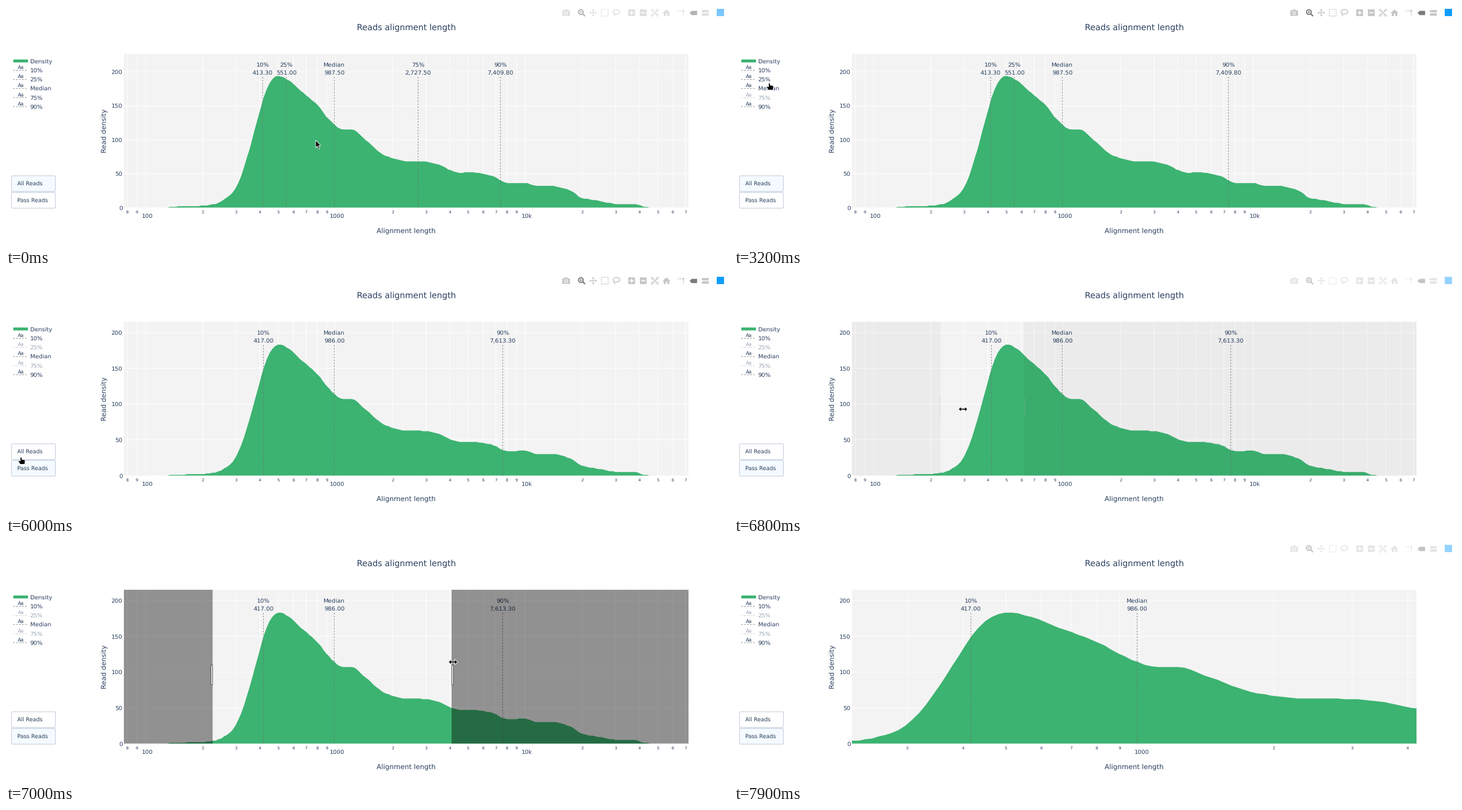
A matplotlib script for the animation above (8000 ms loop, 1280 px wide and 427 px high).

```python
import math

import matplotlib.pyplot as plt
import numpy as np
from matplotlib.animation import FuncAnimation
from matplotlib.collections import LineCollection
from matplotlib.patches import Circle, Ellipse, FancyBboxPatch, Polygon, Rectangle

W, H, DPI = 1280, 427, 64
PT = 72 / DPI  # points per pixel
STEP, FRAMES = 100, 80

LEFT, RIGHT, TOP, BOTTOM = 209, 1210, 85, 358.6
HUNDRED_X, DECADE = 247.7, 336.4
SEL_LEFT, SEL_RIGHT = 366.3, 793.3
INK, GREEN, GREY, DARK = "#2a3f5f", "#3cb371", "#c7c7c7", "#7c7c7c"

PASS_CLICK, PRESS, RELEASE, LEAVE = 5500, 6700, 7200, 7800
HIDE_AT = {"75%": 2500, "25%": 4300}

# turning points of the density curve: stage x, density
DENSITY = [
    (286, 0), (292, 1), (345, 2.6), (369, 5), (397, 18), (411, 35), (431, 84),
    (446, 130), (461, 172), (472, 189), (482, 194), (507, 184), (520, 174),
    (554, 149.5), (569, 133), (598, 115), (613, 115), (633, 103), (672, 76.5),
    (714, 68), (735, 68), (768, 63.5), (789, 54.5), (805, 51.3), (822, 52),
    (860, 47), (890, 36), (918, 36.5), (942, 32), (964, 32), (1000, 25.5),
    (1020, 14.5), (1050, 10), (1088, 5), (1114, 5), (1134, 1), (1155, 0)]
# share of reads that pass, by stage x
PASS_SHARE = [(370, .8), (411, .9), (490, .948), (620, .928), (840, .912), (900, .95)]
BIN = 5.03

QUANTILES = ["10%", "25%", "Median", "75%", "90%"]
ALL_MARKS = [413.3, 551, 987.5, 2727.5, 7409.8]
PASS_MARKS = [417, 551, 986, 2727.5, 7613.3]

# start and end in ms, cursor kind, where it goes
CURSOR_START = (549, 239)
CURSOR_MOVES = [
    (0, 100, "arrow", (546, 238)), (100, 200, "arrow", CURSOR_START),
    (300, 1200, "arrow", (73, 149)), (1200, 1600, "hand", (63, 161)),
    (2900, 3200, "hand", (63, 137)), (4300, 5100, "arrow", (96, 358)),
    (5100, 5500, "hand", (60, 346)), (5500, 6000, "hand", (27, 326)),
    (6000, 6100, "arrow", (549, 227)), (6200, 6300, "arrow", (561, 212)),
    (6300, 6600, "arrow", (368, 240)), (PRESS, 6800, "resize", (406, 240.5)),
    (6800, 7000, "resize", (792.5, 213.5)), (7100, LEAVE, "arrow", (836, 24))]
CURSOR_SHAPES = {
    "arrow": [(0, 0), (0, 13), (3, 10.3), (5.2, 15.3), (7.4, 14.3), (5.2, 9.5), (9, 9.2)],
    "hand": [(-1.8, 0), (.9, 0), (1.2, 3.8), (6.2, 4.6), (7, 6), (6.2, 12.6), (-2.2, 12.6),
             (-3.4, 10), (-5.5, 7.2), (-4.6, 5.8), (-1.8, 6.8)],
    "resize": [(-8, 0), (-3.2, -4.7), (-3.2, -1.4), (3.2, -1.4), (3.2, -4.7), (8, 0),
               (3.2, 4.7), (3.2, 1.4), (-3.2, 1.4), (-3.2, 4.7)],
}

plt.rcParams.update({"font.family": "DejaVu Sans", "text.hinting": "none",
                     "path.snap": False, "toolbar": "None"})
fig = plt.figure(figsize=(W / DPI, H / DPI), dpi=DPI, facecolor="white")
ax = fig.add_axes([0, 0, 1, 1])
ax.set(xlim=(0, W), ylim=(H, 0))
ax.axis("off")
scene = []


def progress(t, start, end):
    return min(1, max(0, (t - start) / (end - start)))


def monotone_curve(points, x):
    """Cubic through the points that never overshoots them."""
    px, py = np.array(points, float).T
    width = np.diff(px)
    rise = np.diff(py) / width
    before, after = rise[:-1], rise[1:]
    turning = before * after <= 0
    slope = np.zeros_like(px)
    slope[1:-1] = np.where(turning, 0, 2 * before * after / np.where(turning, 1, before + after))
    i = np.clip(np.searchsorted(px, x, "right") - 1, 0, len(width) - 1)
    s = (x - px[i]) / width[i]
    bend = (1 - s) * slope[i] - s * slope[i + 1] + (2 * s - 1) * rise[i]
    return py[i] + s * (py[i + 1] - py[i]) + s * (1 - s) * width[i] * bend


def density_curve(passed):
    x = np.arange(DENSITY[0][0], DENSITY[-1][0] + 1, BIN)
    density = monotone_curve(DENSITY, x)
    if passed:
        density = density * np.interp(x, *zip(*PASS_SHARE))
    density = np.round(density)
    density[[0, -1]] = 0
    return x, density


def add(artist):
    ax.add_artist(artist)
    return artist


def box(x, y, w, h, color, edge="none", lw=0, **kw):
    return add(Rectangle((x, y), w, h, fc=color, ec=edge, lw=lw * PT, **kw))


def fill(points, color, **kw):
    return add(Polygon(points, closed=True, fc=color, lw=0, **kw))


def stroke(xs, ys, color, lw=1.0, **kw):
    return ax.plot(xs, ys, color=color, lw=lw * PT, solid_capstyle="butt",
                   dash_capstyle="butt", **kw)[0]


def dotted(xs, ys, **kw):
    return stroke(xs, ys, "#707070", .87, ls=(0, (3, 3)), **kw)


def label(x, y, text, size=10.4, ha="center", **kw):
    return ax.text(x, y, text, size=size * PT, ha=ha, va="baseline", color=INK, **kw)


def arrowheads(cx, cy, angles, reach):
    for a in angles:
        c, s = math.cos(a), math.sin(a)
        tip = (cx + reach * c, cy + reach * s)
        back = (cx + (reach - 3) * c, cy + (reach - 3) * s)
        stroke([cx, back[0]], [cy, back[1]], GREY, 1.3)
        fill([tip, (back[0] - 2.5 * s, back[1] + 2.5 * c),
              (back[0] + 2.5 * s, back[1] - 2.5 * c)], GREY)


def tag(x, y, w, h, color):
    fill([(x, y), (x + h / 2, y - h / 2), (x + w, y - h / 2),
          (x + w, y + h / 2), (x + h / 2, y + h / 2)], color)


def draw_toolbar():
    # camera
    box(986.3, 8, 13.6, 9.6, GREY)
    box(990, 6.3, 6, 2, GREY)
    add(Circle((993, 12.7), 3.2, fc="white", lw=0))
    add(Circle((993, 12.7), 2, fc=GREY, lw=0))
    # magnifier
    add(Circle((1019.2, 10.8), 4.2, fc="none", ec=DARK, lw=2 * PT))
    stroke([1022.3, 1026.6], [13.9, 18], DARK, 2.4)
    stroke([1017, 1021.4], [10.8, 10.8], DARK, 1.2)
    stroke([1019.2, 1019.2], [8.6, 13], DARK, 1.2)
    # pan, box select, lasso
    quarter = math.pi / 2
    arrowheads(1041, 12, [k * quarter for k in range(4)], 6.8)
    stroke([1055.5, 1067.5, 1067.5, 1055.5, 1055.5], [6, 6, 18, 18, 6], GREY, 1.4,
           ls=(0, (1.6, 1)))
    add(Ellipse((1082.3, 10.3), 12, 8, fc="none", ec=GREY, lw=1.6 * PT))
    stroke([1078.5, 1077.8, 1080], [13, 15.5, 18], GREY, 1.5)
    # zoom in and out
    for x in (1109.2, 1129.8):
        box(x - 6, 6, 12, 12, GREY)
        stroke([x - 3.6, x + 3.6], [12, 12], "white", 1.8)
    stroke([1109.2, 1109.2], [8.4, 15.6], "white", 1.8)
    # autoscale
    arrowheads(1150.3, 12, [(k + .5) * quarter for k in range(4)], 6.6)
    for sx in (-1, 1):
        for sy in (-1, 1):
            stroke([1150.3 + sx * 3, 1150.3 + sx * 6.2, 1150.3 + sx * 6.2],
                   [12 + sy * 6, 12 + sy * 6, 12 + sy * 3], GREY, 1.2)
    # home
    fill([(1164, 12.5), (1171, 6), (1178, 12.5)], GREY)
    box(1166, 11.5, 10, 6.5, GREY)
    box(1169.8, 13.8, 2.6, 4.2, "white")
    # spike lines and hover modes
    stroke([1191, 1199], [8.6, 8.6], GREY, 1.7, ls=(0, (1.2, .9)))
    stroke([1200.8, 1200.8], [11, 18], GREY, 1.7, ls=(0, (1.2, .9)))
    box(1199.2, 7, 3.2, 3.2, GREY)
    tag(1211.8, 12.4, 13.4, 7.6, DARK)
    for y in (9.3, 15.2):
        tag(1232.8, y, 13.2, 4.4, GREY)
    box(1260, 5, 13, 13, "#119dff")


def draw_static():
    label(709.8, 42.5, "Reads alignment length", 14.75)
    label(709.5, 403, "Alignment length", 12.15)
    label(177, 222, "Read density", 12, rotation=90, rotation_mode="anchor")
    box(LEFT, TOP, RIGHT - LEFT, BOTTOM - TOP, "#f3f3f3", zorder=0)
    box(13, 95.2, 26, 5.2, GREEN)
    label(42.5, 102, "Density", 10.3, "left")
    draw_toolbar()


def draw_axes(to_x, y_scale):
    lines, texts = [], []
    for decade in (10, 100, 1000, 10000):
        for digit in range(1, 10):
            x = to_x(digit * decade)
            if not LEFT < x < RIGHT:
                continue
            lines.append([(x, TOP), (x, BOTTOM)])
            if digit == 1:
                name = "10k" if decade == 10000 else str(decade)
                texts.append(label(x + 3, 377, name))
            else:
                texts.append(label(x, 368.6, str(digit), 7.2))
    for value in range(0, 201, 50):
        y = BOTTOM - value * y_scale
        texts.append(label(206.5, y + 3.8, str(value), ha="right"))
        if value:
            lines.append([(LEFT, y), (RIGHT, y)])
    grid = LineCollection(lines, colors="white", linewidths=PT, zorder=.5)
    ax.add_collection(grid)
    return [grid, *texts]


def draw_legend(hidden):
    parts = []
    for i, name in enumerate(QUANTILES):
        y = 118 + 16.15 * i
        alpha = .45 if name in hidden else 1
        parts += [label(26.5, y - 6, "Aa", 8.6, alpha=alpha),
                  dotted([13, 37], [y - 3.5] * 2, alpha=alpha),
                  label(42.5, y, name, 10.3, "left", alpha=alpha)]
    return parts


def draw_buttons(passed):
    parts = []
    for y, name, active in ((302, "All Reads", not passed), (331.7, "Pass Reads", passed)):
        shape = FancyBboxPatch((9.8, y), 77.7, 28, boxstyle="round,pad=0,rounding_size=2",
                               fc="#f4faff" if active else "white", ec="#bec8d9", lw=PT)
        parts += [add(shape), label(19.7, y + 16.7, name, 9.7, "left")]
    return parts


def draw_selection(t):
    """Shaded sides and handles while a range is being dragged."""
    if not PRESS < t < RELEASE:
        return []
    edge = 514 + 276 * progress(t, 6800, 7000)
    solid = progress(t, 6785, 6985)
    height = BOTTOM - TOP
    parts = [box(x, TOP, w, height, "black", alpha=.4 * solid, zorder=5)
             for x, w in ((LEFT, SEL_LEFT - LEFT), (edge, RIGHT - edge))]
    for x in (SEL_LEFT - 3, edge + .2):
        parts.append(box(x, 219, 2.8, 35, "white", "#444444", 1, alpha=solid, zorder=6))
    return parts


def draw_cursor(t):
    if t > LEAVE:
        return []
    spot, kind = np.array(CURSOR_START, float), "arrow"
    for start, end, shape, goal in CURSOR_MOVES:
        if t > start:
            p = progress(t, start, end)
            spot = spot + (np.array(goal) - spot) * p * p * (3 - 2 * p)
            kind = shape
    return [add(Polygon(spot + CURSOR_SHAPES[kind], closed=True, fc="black", ec="white",
                        lw=.9 * PT, joinstyle="round", zorder=20))]


def draw_plot(passed, zoomed, hidden):
    y_scale = 1.2725 if passed else 1.2075

    def place(x):
        if zoomed:
            return LEFT + (x - SEL_LEFT) * (RIGHT - LEFT) / (SEL_RIGHT - SEL_LEFT)
        return x

    def to_x(value):
        return place(HUNDRED_X + DECADE * math.log10(value / 100))

    x, density = density_curve(passed)
    area = fill(np.column_stack([place(x), BOTTOM - density * y_scale]), GREEN, zorder=1)
    area.set_clip_path(Rectangle((LEFT, TOP), RIGHT - LEFT, H, transform=ax.transData))
    parts = [area, *draw_axes(to_x, y_scale)]
    for name, value in zip(QUANTILES, PASS_MARKS if passed else ALL_MARKS):
        x = to_x(value)
        if name in hidden or x > RIGHT:
            continue
        parts += [dotted([x, x], [BOTTOM, 125.5], zorder=2),
                  label(x, 107.9, name), label(x, 122, f"{value:,.2f}")]
    return parts


def toolbar_opacity(t):
    def fade(start):
        return 1 - (1 - progress(t, start, start + 300)) ** 2

    if t >= LEAVE:
        return 1 - fade(LEAVE)
    if t >= RELEASE:
        return fade(RELEASE)
    return fade(-STEP) - fade(PRESS)


def draw(frame):
    for artist in scene:
        artist.remove()
    scene.clear()
    t = frame * STEP
    passed = t >= PASS_CLICK
    hidden = {name for name, when in HIDE_AT.items() if t >= when}
    scene.extend(draw_plot(passed, t >= RELEASE, hidden))
    scene.extend(draw_legend(hidden))
    scene.extend(draw_buttons(passed))
    scene.extend(draw_selection(t))
    scene.append(box(980, 2, 300, 20, "white", alpha=1 - toolbar_opacity(t), zorder=10))
    scene.extend(draw_cursor(t))
    return scene


draw_static()
animation = FuncAnimation(fig, draw, frames=FRAMES, interval=STEP, init_func=lambda: scene,
                          repeat=True, repeat_delay=0, blit=False)
plt.show()
```
